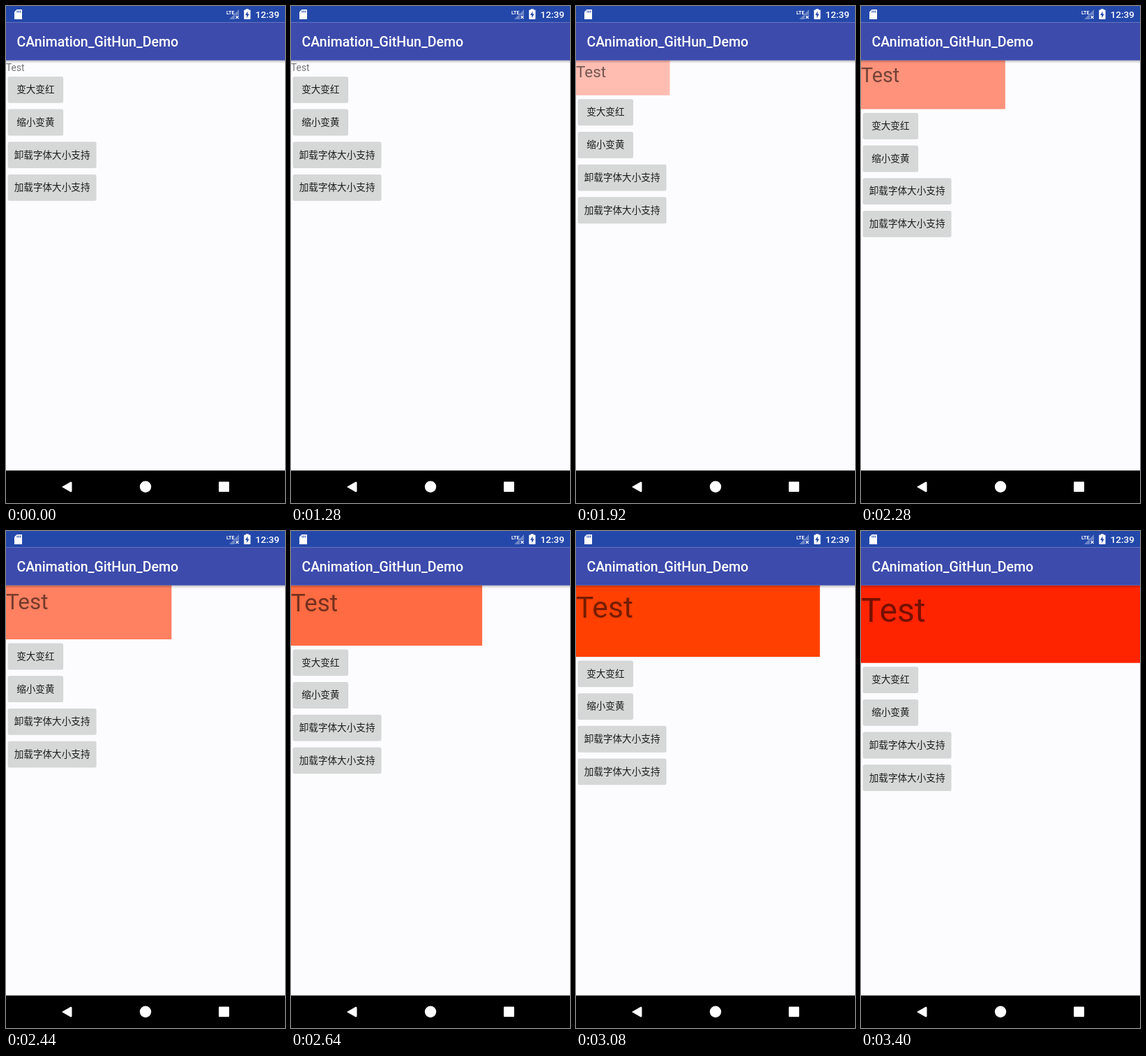
Recreate the animation shown at these times as an HTML page with a canvas. Size 400 px wide and 711 px high, loop 3.44 s.

```html
<!DOCTYPE html>
<html lang="zh-CN">
<head>
<meta charset="utf-8">
<title>Demo</title>
<style>
html, body { margin: 0; width: 100%; height: 100%; overflow: hidden; background: #fcfcff; }
canvas { display: block; width: 100%; height: 100%; }
</style>
</head>
<body>
<canvas width="400" height="711"></canvas>
<script>
const ctx = document.querySelector('canvas').getContext('2d');
const LOOP = 3440, STEP = 40, GROW_START = 1420, GROW_END = 3400;
const TOP = 77.7, ROW = 46.7;
const BAR = '#2448aa', WHITE = '#fff';
const LABELS = ['变大变红', '缩小变黄', '卸载字体大小支持', '加载字体大小支持'];

function rect(color, x, y, w, h, r = 0) {
  ctx.fillStyle = color;
  ctx.beginPath();
  ctx.roundRect(x, y, w, h, r);
  ctx.fill();
}

function poly(color, ...points) {
  ctx.fillStyle = color;
  ctx.beginPath();
  points.forEach(([x, y]) => ctx.lineTo(x, y));
  ctx.closePath();
  ctx.fill();
}

function text(str, x, y, font, color = WHITE, align = 'left') {
  ctx.font = font;
  ctx.fillStyle = color;
  ctx.textAlign = align;
  ctx.fillText(str, x, y);
}

const mix = (a, b, p) => a + (b - a) * p;
const easeOut = (u, bend) => u * (1 + bend - bend * u);

// Growth from 0 to 1; the picture waits at first and pauses once
function growthAt(ms) {
  let t = Math.floor(ms / STEP) * STEP;
  if (t < 1600) return 0;
  if (t > 1720 && t < 1880) t = 1720;
  return (t - GROW_START) / (GROW_END - GROW_START);
}

function drawBox(u, height) {
  const green = mix(255, 36, easeOut(u, 0.25));
  const blue = Math.max(0, mix(255, -51, u));
  const size = mix(13.8, 48.2, u);
  if (u > 0) rect(`rgb(255,${green},${blue})`, 0, TOP, mix(26, 400, easeOut(u, 0.2)), height);
  text('Test', 0, TOP + 1.08 * size, `${size}px Roboto, sans-serif`, 'rgba(0,0,0,.54)');
}

function drawButtons(top) {
  LABELS.forEach((label, i) => {
    const y = top + i * ROW;
    const width = label.length > 4 ? 127 : 79.5;
    rect('#d6d7d7', 2.6, y, width, 37.8, 2.5);
    text(label, 2.6 + width / 2, y + 23.2,
      '13.6px "Noto Sans CJK SC", "Noto Sans CJK", sans-serif', 'rgba(0,0,0,.87)', 'center');
  });
}

function drawStatusBar() {
  rect(BAR, 0, 0, 400, 23.5);
  poly(WHITE, [15.5, 5], [23, 5], [23, 19], [12, 19], [12, 8.5]);
  for (let i = 0; i < 3; i++) rect(BAR, 15.5 + 2.3 * i, 6.5, 1.1, 3);
  poly('rgba(255,255,255,.35)', [334, 5], [334, 13], [328, 13], [328, 19], [320, 19]);
  text('LTE', 316, 11.5, 'bold 7px Roboto, sans-serif');
  ctx.strokeStyle = WHITE;
  ctx.lineWidth = 1.2;
  ctx.beginPath();
  ctx.moveTo(329.5, 14); ctx.lineTo(333.5, 18);
  ctx.moveTo(333.5, 14); ctx.lineTo(329.5, 18);
  ctx.stroke();
  rect(WHITE, 343.8, 4.3, 4, 2);
  rect(WHITE, 341.2, 5.5, 9.3, 13.5, 1);
  poly(BAR, [346.5, 7.5], [343, 13], [345.2, 13], [345.2, 17], [348.7, 11.5], [346.5, 11.5]);
  text('12:39', 392, 17, '500 13.6px Roboto, sans-serif', WHITE, 'right');
}

function drawHeader() {
  rect('#3d4bac', 0, 23.5, 400, TOP - 23.5);
  text('CAnimation_GitHun_Demo', 15.5, 58, '500 19.55px Roboto, sans-serif');
  const shadow = ctx.createLinearGradient(0, TOP, 0, 82);
  shadow.addColorStop(0, 'rgba(0,0,0,.25)');
  shadow.addColorStop(1, 'rgba(0,0,0,0)');
  rect(shadow, 0, TOP, 400, 5);
}

function drawNavBar() {
  rect('#000', 0, 664.5, 400, 47);
  poly(WHITE, [80, 688], [93, 680.5], [94.5, 681.5], [94.5, 694.5], [93, 695.5]);
  rect(WHITE, 191.8, 679.5, 16.4, 16.4, 8.2);
  rect(WHITE, 305, 680.5, 15, 14.5, 1);
}

function draw(ms) {
  const u = growthAt(ms % LOOP);
  const height = mix(17.7, 111, easeOut(u, 0.5));
  rect('#fcfcff', 0, 0, 400, 711);
  drawBox(u, height);
  drawButtons(TOP + height + 5.5);
  drawStatusBar();
  drawHeader();
  drawNavBar();
}

let start;
function tick(now) {
  start ??= now;
  draw(now - start);
  requestAnimationFrame(tick);
}
requestAnimationFrame(tick);
</script>
</body>
</html>
```
